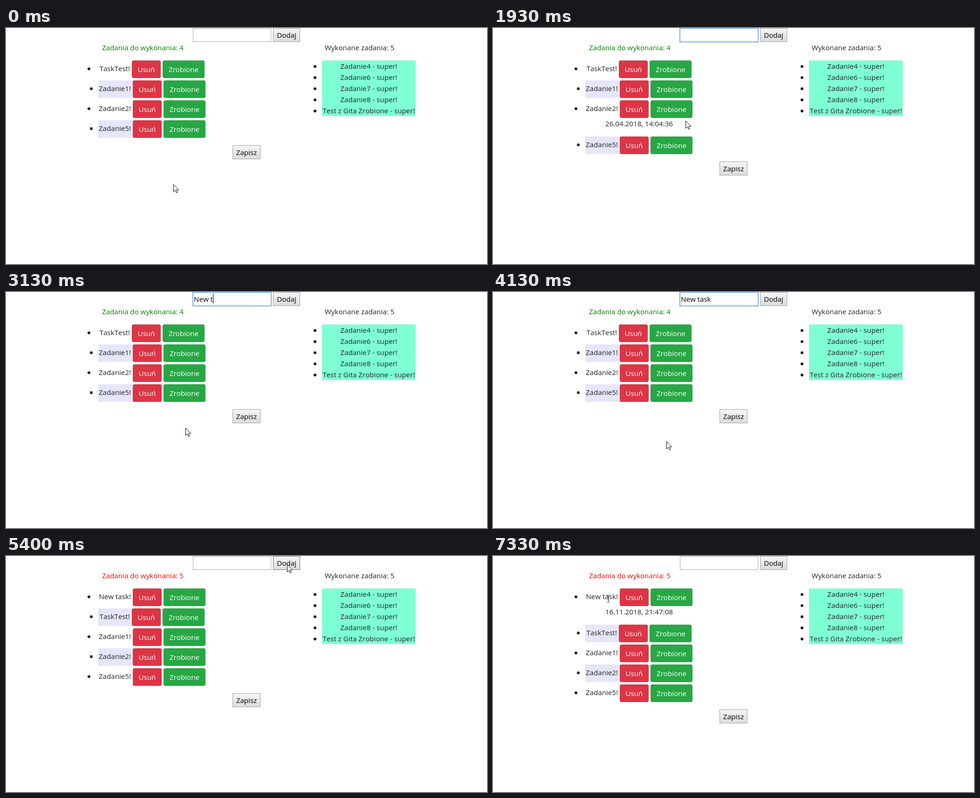
An HTML page for the animation above (8000 ms loop, 1032x509 px).

```html
<!DOCTYPE html>
<html lang="pl">
<head>
<meta charset="utf-8">
<title>Lista zadań</title>
<style>
  html, body { margin: 0; height: 100%; overflow: hidden; background: #fff; }
  svg { display: block; width: 1032px; height: 509px; }
  text { font: 15.15px "Open Sans", "Noto Sans", sans-serif; font-kerning: none; white-space: pre; }
</style>
</head>
<body>
<svg viewBox="0 0 1032 509">
  <defs>
    <linearGradient id="face" x2="0" y2="1">
      <stop stop-color="#f6f6f6"/><stop offset="1" stop-color="#dcdcdc"/>
    </linearGradient>
  </defs>
  <g id="page"></g>
  <path id="caret" stroke="#000"/>
  <path id="arrow" d="M.5 .5V16.5L4.2 13L6.6 18.6L9 17.5L6.6 12H11.6Z" fill="#fff" stroke="#000"/>
  <path id="beam" d="M-2.5 -7.5H-.5M1.5 -7.5H3.5M.5 -7V7M-2.5 7.5H-.5M1.5 7.5H3.5" stroke="#000"/>
</svg>
<script>
const LOOP = 8000, STEP = 1000 / 15, INK = '#212529';
const FOCUS = 1330, TYPING = 2260, KEY_GAP = 181, ADDED = 5330;
const TOP = 70, ROW = 38, GAP = 5, DATE = 24, MARGIN = 16;
const LEFT = 198, RIGHT = 428, MIDDLE = (LEFT + RIGHT) / 2;

const newText = 'New task';
const newTask = { name: newText, date: '16.11.2018, 21:47:08' };
const oldTask = (name, second) => ({ name, date: '26.04.2018, 14:04:' + second });
const tasks = [
  oldTask('TaskTest', 25), oldTask('Zadanie1', 32),
  oldTask('Zadanie2', 36), oldTask('Zadanie5', 43)
];
const done = ['Zadanie4', 'Zadanie6', 'Zadanie7', 'Zadanie8', 'Test z Gita Zrobione'];

const move = (from, to, x, y) => ({ from, to, x, y });
const moves = [
  move(0, 0, 359, 337),
  move(200, 600, 480, 250),
  move(600, 1200, 491, 20),    // click the field
  move(1400, 1740, 420, 170),  // down over the list
  move(1740, 2330, 399, 261),
  move(2330, 3860, 372, 322),
  move(4200, 4470, 716, 31),
  move(4470, 5000, 603, 18),   // click "Dodaj"
  move(5410, 6000, 470, 270),
  move(6200, 6400, 245, 110),  // up to the new task
  move(6400, 6600, 247, 92)
];

const $ = id => document.getElementById(id);
const clamp = (v, lo, hi) => Math.min(hi, Math.max(lo, v));

const ruler = document.createElement('canvas').getContext('2d');
ruler.font = '15.15px "Open Sans", "Noto Sans", sans-serif';
ruler.fontKerning = 'none';
const widthOf = s => ruler.measureText(s).width;

const label = (s, x, y, fill = INK, anchor = 'middle') =>
  `<text x="${x}" y="${y}" fill="${fill}" text-anchor="${anchor}">${s}</text>`;
const box = (x, y, w, h, fill, extra = '') =>
  `<rect x="${x}" y="${y}" width="${w}" height="${h}" fill="${fill}" ${extra}/>`;
const bullet = (x, y) => `<circle cx="${x}" cy="${y}" r="3.1" fill="${INK}"/>`;
const pill = (s, x, y, w, fill) =>
  box(x, y, w, ROW, fill, 'rx="4"') + label(s, x + w / 2, y + 25, '#fff');
const button = (s, x, y, w, edge = '#a0a0a0') =>
  box(x + .5, y + .5, w - 1, 29, 'url(#face)', `stroke="${edge}"`) +
  label(s, x + w / 2, y + 21, '#000');

function taskList(items, open) {
  let y = TOP, bottom = TOP, svg = '';
  items.forEach(({ name, date }, i) => {
    const isOpen = i === open, striped = i % 2;
    const title = name + '!', width = widthOf(title);
    // title and both buttons are centred together, 4 px apart
    const x = Math.ceil(MIDDLE + (width - 160) / 2 + 4);
    bottom = y + ROW + (isOpen ? DATE : 0);
    if (striped) svg += box(LEFT, y, RIGHT - LEFT, bottom - y, 'lavender');
    svg += bullet(striped ? 183 : 178, y + 18) + label(title, x - 4 - width / 2, y + 23) +
      pill('Usuń', x, y, 62, '#dc3545') + pill('Zrobione', x + 66, y, 90, '#28a745');
    if (isOpen) svg += label(date, MIDDLE + .5, y + ROW + 18);
    y = bottom + (isOpen ? MARGIN : GAP);
  });
  return svg + button('Zapisz', 486, bottom + MARGIN, 60);
}

function drawPage({ added, focused, typed, open, hover }) {
  const items = added ? [newTask, ...tasks] : tasks;
  const field = focused
    ? box(401, .5, 168, 29.5, '#fff', 'stroke="#6a9fe8" stroke-width="1.7"')
    : box(401.5, .5, 167, 29, '#fff', 'stroke="#a9a9a9"');
  return field + label(typed, 403, 21, '#000', 'start') +
    button('Dodaj', 573, 0, 58, hover ? '#707070' : undefined) +
    label('Zadania do wykonania: ' + items.length, 293.5, 48, added ? 'red' : 'green') +
    label('Wykonane zadania: ' + done.length, 758.5, 48) +
    taskList(items, open) +
    box(678, TOP, 201, 24 * done.length, 'aquamarine') +
    done.map((s, i) =>
      bullet(663, 83 + 24 * i) + label(s + ' - super!', 778.5, 88 + 24 * i)).join('');
}

function pointerAt(t) {
  let x = 0, y = 0;
  for (const m of moves) {
    if (t < m.from) break;
    const k = clamp((t - m.from) / (m.to - m.from || 1), m.to ? 0 : 1, 1);
    x += (m.x - x) * k;
    y += (m.y - y) * k;
  }
  return [Math.round(x), Math.round(y)];
}

// the hovered row unfolds one screen update after the pointer reaches it
function hoveredRow(t, count) {
  const [x, y] = pointerAt(t - STEP);
  const bottom = TOP + (ROW + GAP) * count - GAP + DATE;
  if (x < LEFT || x > RIGHT || y < TOP || y >= bottom) return -1;
  return Math.min(count - 1, Math.floor((y - TOP) / (ROW + GAP)));
}

let lastState = '';
function render(now) {
  const t = Math.floor((now % LOOP + 5) / STEP) * STEP % LOOP;
  const [x, y] = pointerAt(t);
  const added = t >= ADDED, focused = t >= FOCUS && !added;
  const keys = clamp(Math.floor((t - TYPING) / KEY_GAP) + 1, 0, newText.length);
  const typed = focused ? newText.slice(0, keys) : '';
  const open = hoveredRow(t, tasks.length + added);
  const hover = x >= 573 && x <= 631 && y <= 30;

  const view = { added, focused, typed, open, hover }, state = JSON.stringify(view);
  if (state !== lastState) $('page').innerHTML = drawPage(view);
  lastState = state;

  const lastInput = keys ? TYPING + (keys - 1) * KEY_GAP : FOCUS;
  const caretOn = focused && Math.floor((t - lastInput) / 500) % 2 === 0;
  $('caret').setAttribute('d', caretOn ? `M${Math.round(403 + widthOf(typed)) + .5} 4V25` : '');

  const overField = x > 401 && x < 569 && y < 30;
  const overTitle = open >= 0 && x < 268 && y < TOP + ROW;
  const shape = overField || overTitle ? 'beam' : 'arrow';
  for (const id of ['arrow', 'beam']) {
    $(id).setAttribute('visibility', id === shape ? 'visible' : 'hidden');
    $(id).setAttribute('transform', `translate(${x} ${y})`);
  }
}

const start = performance.now();
(function tick() {
  render(performance.now() - start);
  requestAnimationFrame(tick);
})();
</script>
</body>
</html>
```
